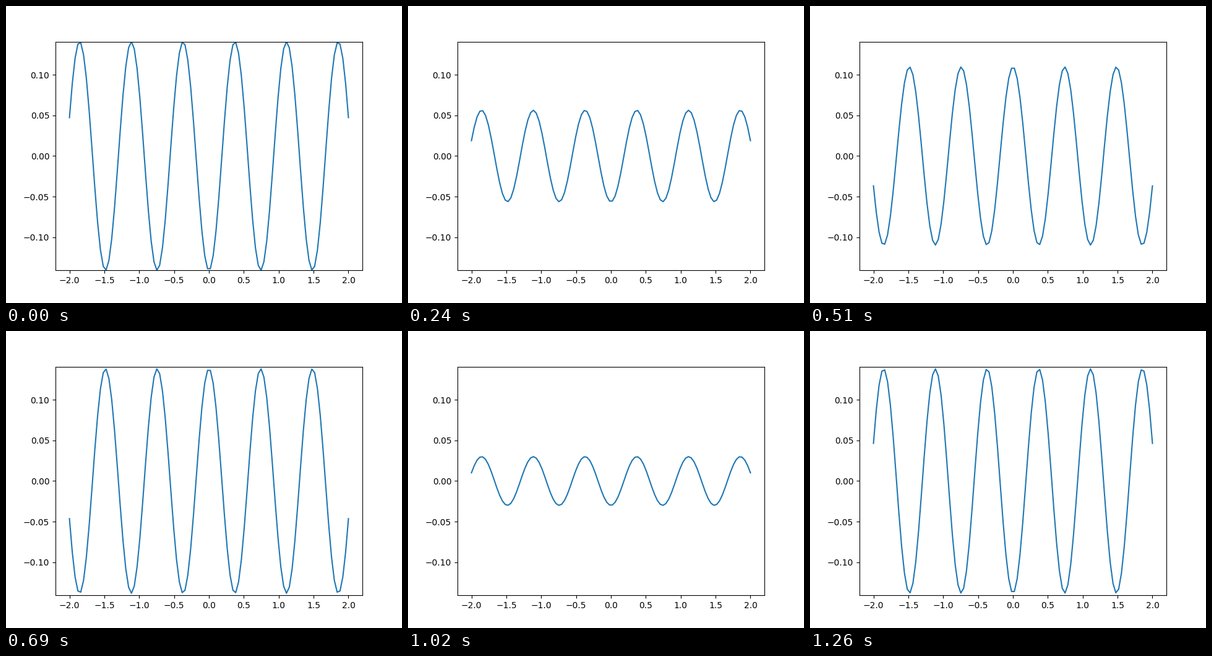
These frames come from a looping animation (640x480 px, 1.29 s). A matplotlib script:

```python
import numpy as np
import matplotlib.pyplot as plt
from matplotlib.animation import FuncAnimation

FRAMES = 43
INTERVAL = 30       # ms
N = 100             # grid points
MODE = 11           # number of half waves between the walls
SPACING = 4 / N
DT = 0.004

# Normalised eigenmode of the discrete Laplacian and its energy
theta = MODE * np.pi / (N + 1)
peak = np.sqrt(2 / (N + 1))
mode = peak * np.sin(theta * np.arange(1, N + 1))
energy = (1 - np.cos(theta)) / SPACING**2

fig, ax = plt.subplots(figsize=(6.4, 4.8), dpi=100)
ax.set_xlim(-2.2, 2.2)
ax.set_ylim(-peak, peak)
line, = ax.plot(np.linspace(-2, 2, N), mode, color="#1f77b4", lw=1.5)


def update(frame):
    line.set_ydata(mode * np.cos(energy * DT * frame))
    return line,


anim = FuncAnimation(fig, update, frames=FRAMES, interval=INTERVAL,
                     repeat=True, repeat_delay=0)
plt.show()
```
